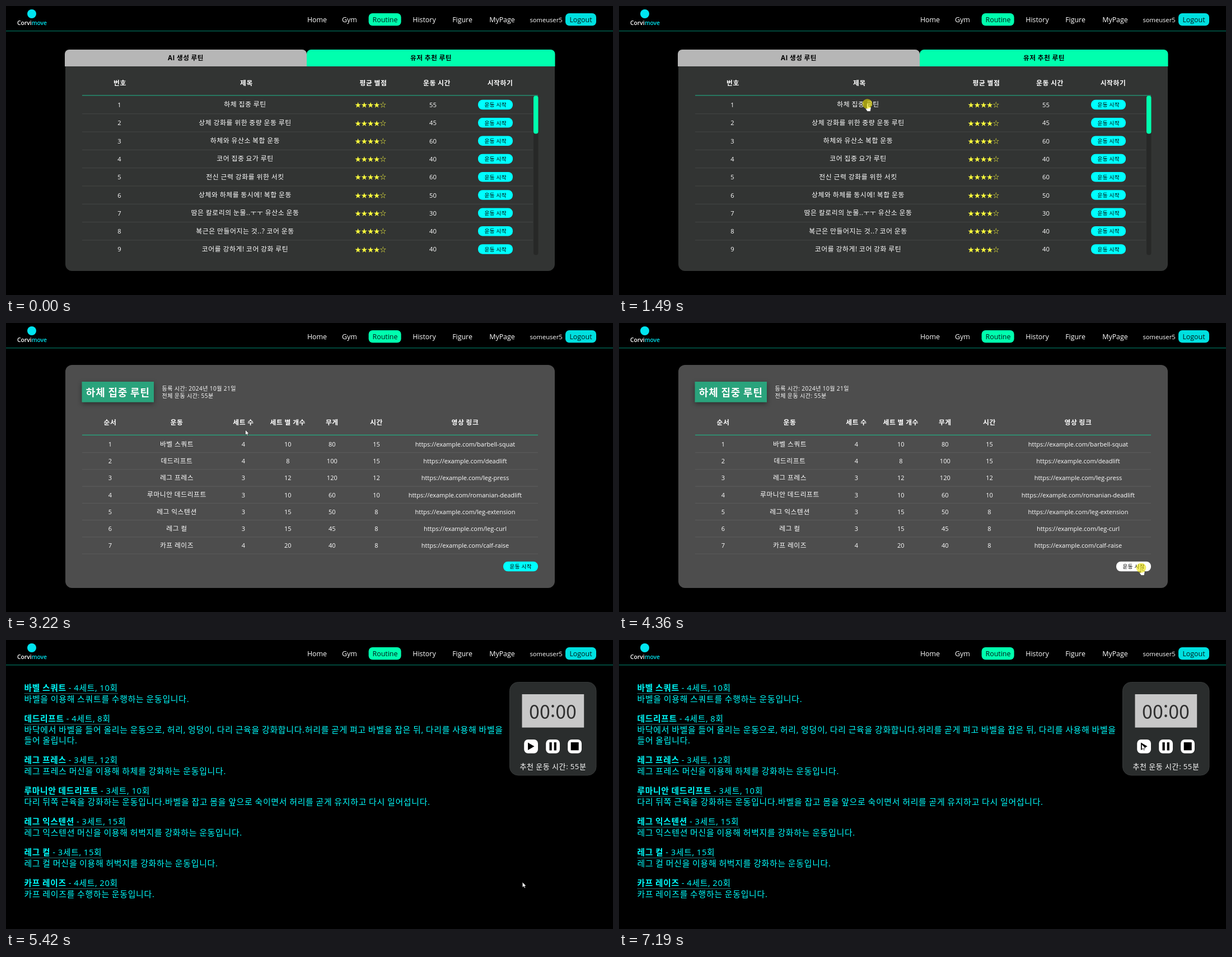
An HTML page that plays this animation: 1084x517 px, repeating every 8 s.

```html
<!DOCTYPE html>
<html lang="ko">
<head>
<meta charset="utf-8">
<title>Routine</title>
<style>
html, body { margin: 0; width: 100%; height: 100%; overflow: hidden; background: #000; }
svg { display: block; width: 1084px; height: 517px; font-family: 'Open Sans', 'Noto Sans CJK KR', 'Noto Sans CJK', sans-serif; }
.lift { filter: drop-shadow(0 3px 4px #0006); }
.clock { font-family: 'Noto Sans CJK KR', 'Noto Sans CJK', sans-serif; }
</style>
</head>
<body>
<svg id="stage" viewBox="0 0 1084 517"></svg>
<script>
const MINT = '#00ffae', CYAN = '#00ffff', LOOP = 8000;
const stage = document.getElementById('stage');
const $ = id => document.getElementById(id);

// Text is placed by the vertical middle of its capitals or syllables.
// Korean is set slightly smaller and looser, as its syllables fill the em square.
function text(s, x, y, size, { fill = '#fff', weight = 400, anchor = 'middle', extra = '' } = {}) {
  const korean = /[가-힣]/.test(s);
  const px = korean ? size * .95 : size;
  const spacing = korean ? 'letter-spacing=".05em" word-spacing="-.04em"' : '';
  return `<text x="${x}" y="${y + px * .375}" font-size="${px}" fill="${fill}" font-weight="${weight}" text-anchor="${anchor}" ${spacing} ${extra}>${s}</text>`;
}
const rect = (x, y, w, h, fill, r = 0, extra = '') =>
  `<rect x="${x}" y="${y}" width="${w}" height="${h}" rx="${r}" fill="${fill}" ${extra}/>`;
const group = (id, ...parts) => `<g id="${id}">${parts.flat(2).join('')}</g>`;
const startButton = (x, y, id = '') =>
  rect(x, y, 62, 17.5, CYAN, 8, id && `id="${id}"`) + text('운동 시작', x + 31.3, y + 9, 10, { fill: '#000', weight: 500 });
const headings = (labels, xs, y) => labels.map((s, i) => text(s, xs[i], y, 12.4, { weight: 700 }));

const routines = [
  ['하체 집중 루틴', 55], ['상체 강화를 위한 중량 운동 루틴', 45], ['하체와 유산소 복합 운동', 60],
  ['코어 집중 요가 루틴', 40], ['전신 근력 강화를 위한 서킷', 60], ['상체와 하체를 동시에! 복합 운동', 50],
  ['땀은 칼로리의 눈물..ㅜㅜ 유산소 운동', 30], ['복근은 만들어지는 것..? 코어 운동', 40], ['코어를 강하게! 코어 강화 루틴', 40]
];
// name, sets, reps, weight, minutes, link, description lines
const exercises = [
  ['바벨 스쿼트', 4, 10, 80, 15, 'barbell-squat', '바벨을 이용해 스쿼트를 수행하는 운동입니다.'],
  ['데드리프트', 4, 8, 100, 15, 'deadlift', '바닥에서 바벨을 들어 올리는 운동으로, 허리, 엉덩이, 다리 근육을 강화합니다.허리를 곧게 펴고 바벨을 잡은 뒤, 다리를 사용해 바벨을', '들어 올립니다.'],
  ['레그 프레스', 3, 12, 120, 12, 'leg-press', '레그 프레스 머신을 이용해 하체를 강화하는 운동입니다.'],
  ['루마니안 데드리프트', 3, 10, 60, 10, 'romanian-deadlift', '다리 뒤쪽 근육을 강화하는 운동입니다.바벨을 잡고 몸을 앞으로 숙이면서 허리를 곧게 유지하고 다시 일어섭니다.'],
  ['레그 익스텐션', 3, 15, 50, 8, 'leg-extension', '레그 익스텐션 머신을 이용해 허벅지를 강화하는 운동입니다.'],
  ['레그 컬', 3, 15, 45, 8, 'leg-curl', '레그 컬 머신을 이용해 허벅지를 강화하는 운동입니다.'],
  ['카프 레이즈', 4, 20, 40, 8, 'calf-raise', '카프 레이즈를 수행하는 운동입니다.']
];

function header() {
  const links = [['Home', 555.5], ['Gym', 613.5], ['Routine', 677], ['History', 747], ['Figure', 815], ['MyPage', 886], ['Logout', 1026.5]];
  return group('header',
    '<circle cx="46" cy="14" r="8" fill="#00e5f0"/>',
    text('Corvi<tspan fill="#00e5f0">move</tspan>', 46.5, 30, 10.3, { weight: 600 }),
    rect(0, 44, 1084, 1.3, '#006b58'),
    rect(647.6, 13, 58, 22.3, MINT, 7),
    rect(999, 13, 55, 22.3, '#00e0e0', 7),
    links.map(([s, x]) => text(s, x, 24.6, 12.4, { fill: /Rou|Log/.test(s) ? '#001a1a' : '#fff' })),
    text('someuser5', 964.5, 25, 11.2));
}

function listPage() {
  const rows = routines.map(([title, minutes], i) => {
    const y = 176.3 + i * 32.3;
    return [
      text(i + 1, 202.5, y + .5, 11.2), text(title, 427, y - .3, 12.5),
      text('★★★★☆', 651, y + .7, 11.2, { fill: '#ffff3c' }),
      text(minutes, 762.5, y + .5, 11.2), startButton(843, y - 8.5),
      i < 8 ? rect(136, y + 16, 805, 1, '#444645') : ''
    ].join('');
  });
  return group('list',
    '<path d="M106 107H980V462a12 12 0 0 1-12 12H118a12 12 0 0 1-12-12Z" fill="#323433"/>',
    '<path d="M105 108V86a8 8 0 0 1 8-8H529a8 8 0 0 1 8 8V108Z" fill="#b6b6b6"/>',
    `<path d="M537 108V86a8 8 0 0 1 8-8H972.5a8 8 0 0 1 8 8V108Z" fill="${MINT}"/>`,
    text('AI 생성 루틴', 321, 93, 12.2, { fill: '#000', weight: 700 }),
    text('유저 추천 루틴', 759, 93, 12.3, { fill: '#000', weight: 700 }),
    headings(['번호', '제목', '평균 별점', '운동 시간', '시작하기'], [203.5, 429.5, 656, 769.5, 882.5], 138),
    rect(136, 159.3, 814, 1.3, '#239a78'),
    rows,
    rect(942, 160.5, 8.5, 285, '#272827', 4),
    rect(942, 160.5, 8.5, 68, MINT, 4));
}

function detailPage() {
  const xs = [186, 305, 424, 503.3, 582.3, 661.5, 820];
  const left = { anchor: 'start' };
  const rows = exercises.map(([name, sets, reps, kg, min, slug], i) => {
    const y = 216.8 + i * 30.2;
    const cells = [i + 1, name, sets, reps, kg, min, 'https://example.com/' + slug];
    return cells.map((s, c) => text(s, xs[c], c == 1 ? y - .5 : y, c == 1 ? 12.4 : 11)).join('') +
      rect(136, y + 14.5, 814, 1, '#5d5d5d');
  });
  return group('detail',
    rect(106, 75, 874, 399, '#4d4d4d', 12),
    rect(135.5, 105, 128.5, 36.7, '#2aa37c', 0, 'class="lift"'),
    text('하체 집중 루틴', 199.8, 124, 18.9, { weight: 700 }),
    text('등록 시간:', 278.5, 117, 10.6, { ...left, extra: 'id="created"' }),
    text('전체 운동 시간:', 278.5, 130, 10.6, { ...left, extra: 'id="total"' }),
    headings(['순서', '운동', '세트 수', '세트 별 개수', '무게', '시간', '영상 링크'], xs, 178),
    rect(136, 199.8, 814, 1.3, '#25a981'),
    group('exerciseRows', rows),
    group('detailButton', startButton(888, 215.5, 'startFill')));
}

function timerPage() {
  let y = 85.3;
  const style = { fill: CYAN, anchor: 'start' };
  const items = exercises.map(([name, sets, reps, , , , ...lines]) => {
    const top = y;
    y += 55 + (lines.length - 1) * 19;
    return text(`<tspan font-weight="700">${name}</tspan> - ${sets}세트, ${reps}회`, 32.5, top, 15.5, { ...style, extra: 'class="name"' }) +
      rect(32.5, top + 10, 0, 1, '#2b7373') +
      lines.map((s, i) => text(s, 32.5, top + 20.6 + i * 19, 15.67, style)).join('');
  });
  return group('timer',
    group('items', items),
    rect(899.5, 75.5, 154.5, 166.5, '#2a2d2d', 15, 'stroke="#363939"'),
    rect(921.5, 97, 110.7, 59.6, '#c8c8c8'),
    text('00:00', 976.5, 128.5, 34, { fill: '#303030', extra: 'class="clock"' }),
    [925.2, 964.2, 1003.2].map(x => rect(x, 178, 24.8, 24.8, '#fff', 7)),
    '<path d="M932 183.5L943.5 190.3L932 197Z"/>',
    rect(970.5, 183, 4.2, 14.5, '#000'), rect(978.7, 183, 4.2, 14.5, '#000'),
    rect(1008.7, 183, 14, 14.3, '#000'),
    text('추천 운동 시간:', 977, 225.8, 13.7, { extra: 'id="advice"' }));
}

const pointer = group('pointer',
  '<path id="hand" d="M-1.3 5V0Q0-1.8 1.3 0V4.5L5 5.6Q6.3 6 6 8L5 13.5H-.5L-3.7 9Q-3.8 7-1.3 8.3Z" fill="#fff" stroke="#222" stroke-width=".6"/>',
  '<path id="arrow" d="M0 0V9.3L2.2 7.4L3.7 10.7L5.2 10L3.8 6.9H6.6Z" fill="#fff" stroke="#111" stroke-width=".6"/>',
  '<circle id="halo" cx="-.5" cy="0" r="8.8" fill="#ebe100" fill-opacity=".6"/>');

stage.innerHTML = header() + listPage() + detailPage() + timerPage() + pointer;
for (const name of document.querySelectorAll('.name'))
  name.nextElementSibling.setAttribute('width', name.getComputedTextLength());

// start, end, number of steps, waypoints
const moves = [
  [210, 770, 9, [[1090, 391], [1035, 220], [955, 90], [995, 22]]],
  [990, 1490, 8, [[995, 22], [444, 175]]],
  [2280, 2420, 3, [[444, 175], [364, 160]]],
  [3220, 3770, 9, [[364, 160], [935, 440]]],
  [3970, 4030, 2, [[935, 440], [933, 438]]],
  [5420, 5830, 6, [[933.5, 438], [866, 409]]],
  [6430, 6930, 8, [[866, 409], [933.5, 186.5]]]
];
const clicks = [[1490, 1640], [4360, 4430], [7130, 7190]];

function pointerAt(t) {
  const [start, end, steps, path] = moves.filter(m => t >= m[0]).pop() || moves[0];
  const done = t < start ? 0 : Math.min(steps, Math.floor((t - start) / (end - start) * (steps - 1) + 1.001));
  const along = done / steps * (path.length - 1);
  const i = Math.min(Math.floor(along), path.length - 2);
  return path[i].map((v, axis) => v + (path[i + 1][axis] - v) * (along - i));
}

const show = (id, on) => $(id).setAttribute('display', on ? 'inline' : 'none');

function draw(t) {
  const [x, y] = pointerAt(t);
  const onList = t < 1640, onTimer = t >= 4430, onDetail = !onList && !onTimer;
  const loaded = t >= 1710, ready = t >= 4490;
  const overButton = onDetail && x > 888 && x < 950 && y > 427 && y < 445;
  const isHand = overButton || (onList && y > 160 && x < 941);

  show('list', onList);
  show('detail', onDetail);
  show('timer', onTimer);
  show('exerciseRows', loaded);
  show('items', ready);
  $('created').textContent = '등록 시간:' + (loaded ? ' 2024년 10월 21일' : '');
  $('total').textContent = `전체 운동 시간: ${loaded ? 55 : 0}분`;
  $('advice').textContent = `추천 운동 시간: ${ready ? 55 : 0}분`;
  $('detailButton').setAttribute('transform', `translate(0 ${loaded ? 211.3 : 0})`);
  $('startFill').setAttribute('fill', overButton ? '#fff' : CYAN);

  show('pointer', t >= 210);
  show('hand', isHand);
  show('arrow', !isHand);
  show('halo', clicks.some(([from, to]) => t >= from && t < to));
  $('pointer').setAttribute('transform', `translate(${x} ${y})`);
}

const began = performance.now();
function frame() {
  draw((performance.now() - began) % LOOP);
  requestAnimationFrame(frame);
}
frame();
</script>
</body>
</html>
```
